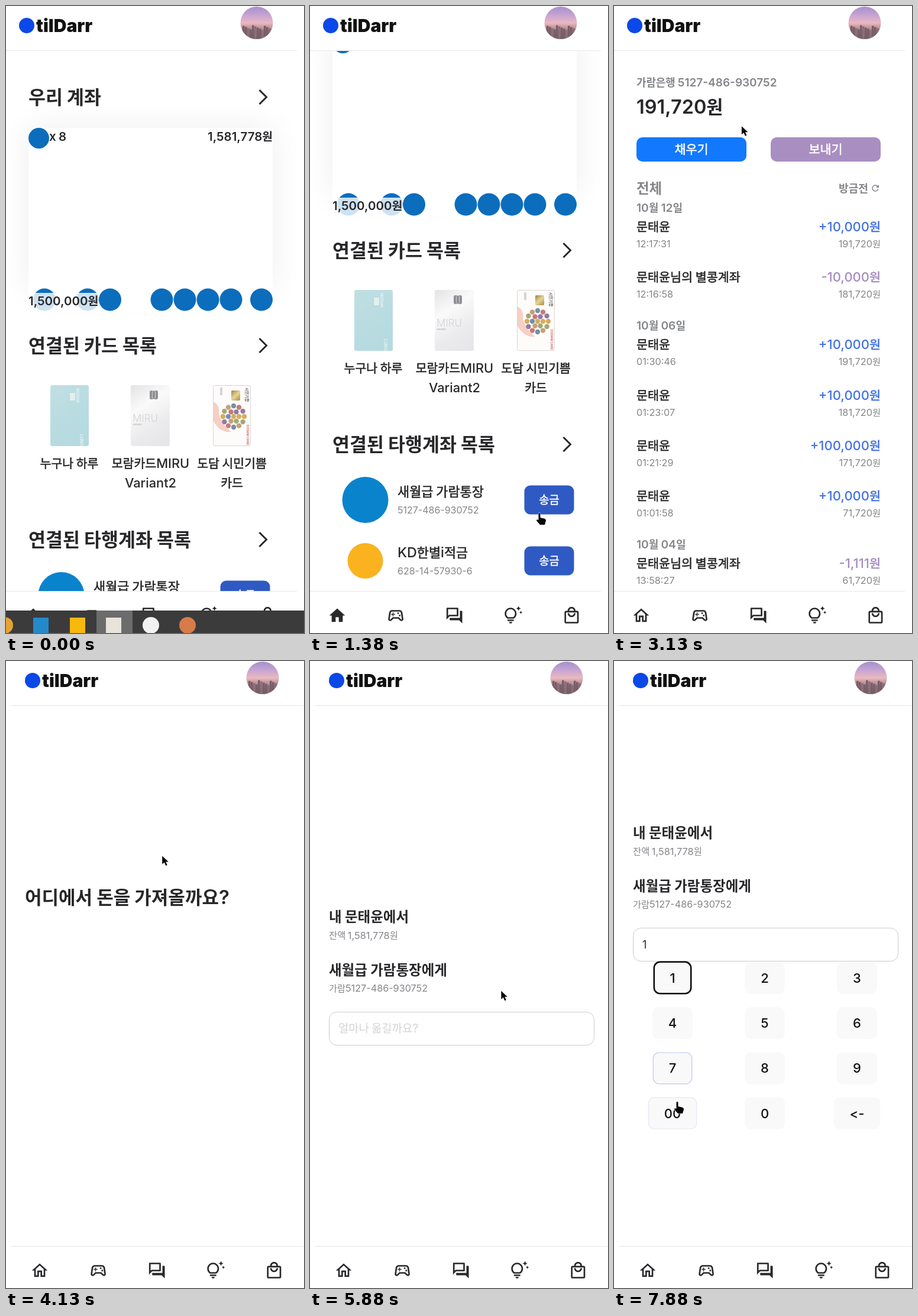
An HTML page with a canvas that plays this animation: 504 px wide and 1060 px high, repeating every 8 s.

```html
<!DOCTYPE html>
<html lang="ko">
<head>
<meta charset="utf-8">
<style>
html, body { margin: 0; width: 100%; height: 100%; overflow: hidden; background: #fff; }
canvas { display: block; }
</style>
</head>
<body>
<canvas id="stage" width="504" height="1060"></canvas>
<script>
const ctx = document.getElementById('stage').getContext('2d');
const INK = '#28282b', GREY = '#84868a', LILAC = '#a98ec2', BLUE = '#0a48e8', BALL = '#0c6dbd';
const OWNER = '문태윤', OWN_ACCOUNT = OWNER + '님의 별콩계좌';
const BANKS = [
  { name: '새월급 가람통장', no: '5127-486-930752', color: '#0a83cd' },
  { name: 'KD한별i적금', no: '628-14-57930-6', color: '#fab31e', short: '들빛' },
  { name: 'TRM기쁨돌보미통장', no: '417-09-685042-8', color: '#d3222c', short: '미르', square: true },
];
const HISTORY = [
  [373, 0, '12:17:31', '+10,000', '191,720'],
  [458, 1, '12:16:58', '-10,000', '181,720'],
  [572, 0, '01:30:46', '+10,000', '191,720'],
  [658, 0, '01:23:07', '+10,000', '181,720'],
  [743, 0, '01:21:29', '+100,000', '171,720'],
  [828, 0, '01:01:58', '+10,000', '71,720'],
  [942, 1, '13:58:27', '-1,111', '61,720'],
];
// Moments at which each screen or part of it appears.
const AT = { account: 2500, history: 2690, charge: 4000, sources: 4400, amount: 5630, keypad: 6250, digit: 7300 };
const CLICKS = [2200, 3480, 5480, 6130, 7250];
// time, scroll offset
const SCROLL = [[780, 0], [1380, 161], [1850, 250]];
// time, x, y, hand shape
const POINTER = [
  [880, 330, 1050, 0], [1250, 388, 857, 1], [1750, 388, 857, 1], [2100, 427, 744, 1],
  [2420, 427, 744, 0], [3130, 216, 203, 0], [3380, 190, 245, 1], [3750, 190, 245, 0],
  [4900, 414, 500, 1], [5750, 414, 500, 0], [6000, 241, 610, 0], [6250, 241, 600, 1],
  [6500, 241, 593, 1], [6700, 241, 593, 1], [7130, 104, 545, 1], [7380, 104, 545, 1],
  [7630, 105, 690, 1], [7750, 106, 712, 1], [7880, 107, 745, 1],
];
const HAND = new Path2D('M-1.500 1Q0-1 1.500 1V8L8 9.500Q11 10 11 13L9 20H1L-5 13Q-5 10-1.500 12Z');
const ARROW = new Path2D('M0 0V14L3.500 11 6 16.500 8.500 15.500 6 10H10.500Z');
const HOME = new Path2D('M10 20v-6h4v6h5v-8h3L12 3 2 12h3v8z');
const ICONS = [
  'M12 5.69l5 4.5V18h-2v-6H9v6H7v-7.81l5-4.5M12 3L2 12h3v8h6v-6h2v6h6v-8h3L12 3z',
  'M21.58 16.09l-1.09-7.66C20.21 6.46 18.52 5 16.53 5H7.47C5.48 5 3.79 6.46 3.51 8.43l-1.09 7.66C2.2 17.63 3.39 19 4.94 19c.68 0 1.32-.27 1.8-.75L9 16h6l2.25 2.25c.48.48 1.13.75 1.8.75 1.56 0 2.75-1.37 2.53-2.91zm-2.1.72c-.08.09-.21.19-.42.19-.15 0-.29-.06-.39-.16L15.83 14H8.17l-2.84 2.84c-.1.1-.24.16-.39.16-.21 0-.34-.1-.42-.19-.08-.09-.16-.23-.13-.44l1.09-7.66C5.63 7.74 6.48 7 7.47 7h9.06c.99 0 1.84.74 1.98 1.72l1.09 7.66c.03.2-.05.34-.12.43zM9 8H8v2H6v1h2v2h1v-2h2v-1H9zM14 8h2v2h-2zM16 11h2v2h-2z',
  'M15 4v7H5.17L4 12.17V4h11m1-2H3c-.55 0-1 .45-1 1v14l4-4h10c.55 0 1-.45 1-1V3c0-.55-.45-1-1-1zm5 4h-2v9H6v2c0 .55.45 1 1 1h11l4 4V7c0-.55-.45-1-1-1z',
  'M7 20h4c0 1.1-.9 2-2 2s-2-.9-2-2zm-2-1h8v-2H5v2zm11.5-9.5c0 3.82-2.66 5.86-3.77 6.5H5.27c-1.11-.64-3.77-2.68-3.77-6.5C1.5 5.36 4.86 2 9 2s7.5 3.36 7.5 7.5zm-2 0C14.5 6.47 12.03 4 9 4S3.5 6.47 3.5 9.5c0 2.47 1.49 3.89 2.35 4.5h6.3c.86-.61 2.35-2.03 2.35-4.5zm6.87-2.13L20 8l1.37.63L22 10l.63-1.37L24 8l-1.37-.63L22 6l-.63 1.37zM19 6l.94-2.06L22 3l-2.06-.94L19 0l-.94 2.06L16 3l2.06.94L19 6z',
  'M19 6h-2c0-2.76-2.24-5-5-5S7 3.24 7 6H5c-1.1 0-1.99.9-1.99 2L3 20c0 1.1.9 2 2 2h14c1.1 0 2-.9 2-2V8c0-1.1-.9-2-2-2zm-7-3c1.66 0 3 1.34 3 3H9c0-1.66 1.34-3 3-3zm7 17H5V8h14v12zm-7-8c-1.66 0-3-1.34-3-3H7c0 2.76 2.24 5 5 5s5-2.24 5-5h-2c0 1.66-1.34 3-3 3z',
].map(d => new Path2D(d));

const clamp = v => Math.max(0, Math.min(1, v));
const isKorean = run => /[가-힣 ]/.test(run);

function along(keys, t) {
  const i = keys.findIndex(k => k[0] > t);
  if (i === 0) return keys[0];
  if (i < 0) return keys[keys.length - 1];
  const a = keys[i - 1], b = keys[i], p = (t - a[0]) / (b[0] - a[0]);
  return a.map((v, n) => v + (b[n] - v) * p);
}

// '<' stays a run of its own so that "<-" does not turn into an arrow.
const split = str => str.match(/[가-힣 ]+|<|[^가-힣 <]+/g);

function setFont(run, size, weight) {
  ctx.font = isKorean(run)
    ? `${weight} ${size * .94}px "Noto Sans CJK KR", "Noto Sans CJK", sans-serif`
    : `${weight} ${size}px Inter, sans-serif`;
  return ctx.measureText(run).width;
}

const widthOf = (str, size, weight) =>
  split(str).reduce((sum, run) => sum + setFont(run, size, weight), 0);

// y is the middle of the line; align 0, .5 or 1 means left, centre or right.
function text(str, x, y, size, weight = 400, color = INK, align = 0) {
  x -= align * widthOf(str, size, weight);
  ctx.fillStyle = ctx.strokeStyle = color;
  ctx.lineWidth = size * .026;
  for (const run of split(str)) {
    const width = setFont(run, size, weight);
    ctx.fillText(run, x, y + size * .36);
    // The Korean face has no medium weight of its own.
    if (weight === 500 && isKorean(run)) ctx.strokeText(run, x, y + size * .36);
    x += width;
  }
}

function rect(x, y, w, h, fill, radius = 0) {
  ctx.beginPath();
  ctx.roundRect(x, y, w, h, radius);
  ctx.fillStyle = fill;
  ctx.fill();
}

function frame(x, y, w, h, color, line, radius) {
  ctx.beginPath();
  ctx.roundRect(x + line / 2, y + line / 2, w - line, h - line, radius);
  ctx.strokeStyle = color;
  ctx.lineWidth = line;
  ctx.stroke();
}

function disc(x, y, r, fill) {
  ctx.beginPath();
  ctx.arc(x, y, r, 0, 7);
  ctx.fillStyle = fill;
  ctx.fill();
}

function gradient(x0, y0, x1, y1, ...colors) {
  const g = ctx.createLinearGradient(x0, y0, x1, y1);
  colors.forEach((c, i) => g.addColorStop(i / (colors.length - 1), c));
  return g;
}

function mark(bank, x, y, r) {
  if (bank.square) rect(x - r, y - r, 2 * r, 2 * r, bank.color);
  else disc(x, y, r, bank.color);
}

function button(label, x, y, w, h, color, size = 22) {
  rect(x, y, w, h, color, 10);
  text(label, x + w / 2, y + h / 2, size, 500, '#fff', .5);
}

// Border that fades in and out as the pointer enters and leaves.
function hover(t, x, y, w, h) {
  let hits = 0;
  for (let k = 0; k < 6; k++) {
    const [, px, py] = along(POINTER, t - k * 45);
    if (px > x && px < x + w && py > y && py < y + h) hits++;
  }
  if (hits) frame(x, y, w, h, `rgba(100,108,235,${hits / 8})`, 1.2, 10);
}

function heading(str, y) {
  text(str, 38, y, 33.5, 600);
  ctx.beginPath();
  ctx.moveTo(428.5, y - 12);
  ctx.lineTo(440.5, y);
  ctx.lineTo(428.5, y + 12);
  ctx.strokeStyle = INK;
  ctx.lineWidth = 3;
  ctx.stroke();
}

function sideText(str, x, y, size, color) {
  ctx.save();
  ctx.translate(x, y);
  ctx.rotate(Math.PI / 2);
  text(str, 0, 0, size, 600, color);
  ctx.restore();
}

function cards() {
  rect(75, 641, 65, 103, gradient(75, 641, 140, 744, '#bfdfe3', '#b3d9df'), 3);
  rect(107, 653, 11, 15, '#e3efef', 2);
  frame(107, 653, 11, 15, '#a5c8cd', .7, 2);
  sideText('MODAM', 121, 646, 6, '#e6f5f6');
  sideText('LUNO', 128, 724, 7, '#e6f5f6');

  rect(211, 641, 66, 103, gradient(211, 641, 277, 744, '#e3e3e5', '#fafafa', '#ebebed', '#e5e5e7'), 3);
  rect(243, 650, 14, 15, '#8f9094', 3);
  frame(247, 650, 6, 15, '#d0d0d2', 1, 1);
  text('MIRU', 214, 697, 17, 300, '#d3d3d6');
  text('Variant2', 214, 708, 4, 500, '#b0b0b4');

  rect(350, 641, 64, 103, '#fdfcfb', 3);
  frame(350, 641, 64, 103, '#d8d5d3', 1, 3);
  rect(381, 650, 15, 17, gradient(381, 650, 396, 667, '#9b813f', '#e6d596', '#a98b45'), 2);
  rect(362, 645, 4, 13, '#d5d3d5');
  ctx.beginPath();
  ctx.moveTo(351, 669);
  ctx.quadraticCurveTo(362, 675, 360, 690);
  ctx.quadraticCurveTo(365, 708, 381, 720);
  ctx.quadraticCurveTo(362, 722, 351, 702);
  ctx.fillStyle = '#f6cfc5';
  ctx.fill();
  const colors = ['#d9ac5c', '#8f7aa9', '#c97a70', '#7391ae', '#cb9e75', '#a0aa76'];
  for (let i = 0; i < 19; i++) {
    const ring = i === 0 ? 0 : i < 7 ? 1 : 2;
    const angle = ring && i * Math.PI / (3 * ring);
    disc(385 + Math.cos(angle) * ring * 9, 694 + Math.sin(angle) * ring * 9, 4.2, colors[i * 5 % 6]);
  }
  sideText('시민기쁨', 408, 645, 7, '#77706c');
  sideText('DODAM CARD', 409, 708, 5, '#cf5b5b');

  const label = (str, x, y) => text(str, x, y, 21.8, 500, INK, .5);
  label('누구나 하루', 107, 773);
  label('모람카드MIRU', 244.5, 773);
  label('Variant2', 244.5, 806);
  label('도담 시민기쁨', 382, 773);
  label('카드', 382, 806);
}

function homeScreen(t) {
  ctx.translate(0, -Math.round(along(SCROLL, t)[1]));
  heading('우리 계좌', 154);

  ctx.shadowColor = 'rgba(0,0,0,.07)';
  ctx.shadowBlur = 50;
  rect(38, 206, 413, 276, '#fff');
  ctx.shadowColor = 'transparent';
  rect(38, 480, 413, 36, '#fff');
  disc(55.5, 223.5, 17.5, BALL);
  text('x 8', 73, 221, 20.5, 600);
  text('1,581,778원', 451, 221, 20.5, 600, INK, 1);
  disc(65, 496.5, 19, BALL);
  disc(138, 496.5, 19, BALL);
  rect(38, 485, 119, 31, 'rgba(255,255,255,.8)');
  for (const x of [176, 263.5, 302.5, 341.5, 380.5, 432]) disc(x, 496.5, 19, BALL);
  text('1,500,000원', 38, 499, 20.5, 600);

  heading('연결된 카드 목록', 574);
  cards();

  heading('연결된 타행계좌 목록', 902);
  BANKS.forEach((bank, i) => {
    const y = 996 + 103 * i;
    mark(bank, 93.5, y, [39, 30, 20][i]);
    text(bank.name, 148, y - 14, 23.3, 500);
    text(bank.no, 148, y + 17, 16, 400, GREY);
    button('송금', 362.5, y - 24.5, 84, 49, '#2f5ac3', 20);
  });
  if (t > 2130) frame(362, 971, 85, 50, '#0c0c10', 2.5, 10);
}

function accountScreen(t) {
  button('채우기', 38, 222, 186, 41, '#1279ff');
  button('보내기', 265, 222, 186, 41, LILAC);
  if (t < AT.history) return;
  text('가람은행 ' + BANKS[0].no, 38, 129, 19, 600, GREY);
  text('191,720원', 38, 170, 32.5, 600);
  text('전체', 38, 308, 25, 600, GREY);
  text('방금전', 430, 308, 19.3, 600, GREY, 1);
  ctx.beginPath();
  ctx.arc(442, 308, 5, .3, 5.6);
  ctx.strokeStyle = GREY;
  ctx.lineWidth = 1.5;
  ctx.stroke();
  ctx.beginPath();
  ctx.moveTo(448, 302);
  ctx.lineTo(448, 307);
  ctx.lineTo(443, 307);
  ctx.fillStyle = GREY;
  ctx.fill();

  [['10월 12일', 341], ['10월 06일', 540], ['10월 04일', 910]]
    .forEach(([day, y]) => text(day, 38, y, 19.2, 600, GREY));
  for (const [y, own, time, change, balance] of HISTORY) {
    text(own ? OWN_ACCOUNT : OWNER, 38, y, 22, 500);
    text(time, 38, y + 29, 16.2, 400, GREY);
    text(change + '원', 451, y, 22, 500, own ? '#a48cc0' : '#4272e6', 1);
    text(balance + '원', 451, y + 29, 16.3, 400, GREY, 1);
  }
}

function chargeScreen(t) {
  text('어디에서 돈을 가져올까요?', 32, 399, 33, 600);
  if (t < AT.sources) return;
  text('내 계좌', 32, 462, 25, 600);
  const sources = [
    { name: OWN_ACCOUNT, no: '58146-370925-418', short: '별콩', color: BLUE },
    BANKS[1], BANKS[2],
  ];
  sources.forEach((source, i) => {
    const y = 510 + 69 * i;
    mark(source, 59.5, y, [27.5, 21, 14][i]);
    text(source.name, 101, y - 14, 19.3, 600);
    text(source.short + source.no, 101, y + 14, 16.2, 400, GREY);
    button('채우기', 386, y - 21, 92, 42, LILAC);
    hover(t, 386, y - 21, 92, 42);
  });
}

function amountScreen(t) {
  const open = t >= AT.keypad, typed = t >= AT.digit;
  if (!open) ctx.translate(0, 142);
  text(`내 ${OWNER}에서`, 32, 290, 25, 600);
  text('잔액 1,581,778원', 32, 322, 16.4, 400, GREY);
  text(BANKS[0].name + '에게', 32, 380, 25, 600);
  text('가람' + BANKS[0].no, 32, 411, 16.2, 400, GREY);
  if (open) keypad(t);
  const focused = open && !typed;
  rect(32, 451, 449, 57, '#fff', 14);
  if (focused) frame(31.5, 450.5, 450, 58, '#0c0c10', 2.8, 13);
  else frame(32, 451, 449, 57, '#cbcbcf', 1, 13);
  if (typed) text('1', 48, 480, 18, 400);
  else text('얼마나 옮길까요?', 48, 479, 20, 400, '#d3d3d5');
  if (focused) rect(47, 469, 1.2, 21, '#111');
  if (typed) frame(66.5, 507.5, 65, 56, '#0c0c10', 2.6, 10);
}

function keypad(t) {
  ['1', '2', '3', '4', '5', '6', '7', '8', '9', '00', '0', '<-'].forEach((key, i) => {
    const x = 99 + 156 * (i % 3), y = 536 + 76.2 * Math.floor(i / 3);
    const w = widthOf(key, 22, 500) + 54;
    rect(x - w / 2, y - 27, w, 54, '#f9f9f9', 10);
    hover(t, x - w / 2, y - 27, w, 54);
    text(key, x, y, 22, 500, '#111', .5);
  });
}

function avatar(x, y) {
  ctx.save();
  ctx.beginPath();
  ctx.arc(x, y, 27.5, 0, 7);
  ctx.clip();
  rect(x - 28, y - 28, 56, 56, gradient(x, y - 28, x, y + 28, '#a58fcb', '#c3a2d3', '#eab9c0', '#a27c83', '#5f4d5c'));
  for (let i = 0; i < 14; i++) {
    const h = 4 + i * 7 % 9;
    rect(x - 28 + i * 4, y + 16 - h, 3.6, 40, i % 3 ? '#755f6b' : '#8f6d70');
  }
  ctx.restore();
}

function chrome(home, shift) {
  const edge = shift ? 8 : 0;
  rect(0, 0, 504, 75, '#fff');
  rect(0, 989, 504, 71, '#fff');
  rect(edge, 75, shift ? 495 : 492, 1, '#e6e7e9');
  rect(edge, 989, shift ? 495 : 492, 1, '#e6e7e9');
  disc(35 + shift, 33, 13, BLUE);
  text('tilDarr', 51 + shift, 33.5, 30, 900, '#111');
  avatar(424 + shift, 28.5);
  ICONS.forEach((icon, i) => {
    ctx.save();
    ctx.translate(46 + 99.1 * i + shift * 1.1, 1030.5);
    ctx.scale(4 / 3, 4 / 3);
    ctx.translate(-12, -12);
    ctx.fillStyle = INK;
    ctx.fill(home && i === 0 ? HOME : icon, 'evenodd');
    ctx.restore();
  });
}

function taskbar(t) {
  const drop = clamp((t - 440) / 190);
  if (drop === 1) return;
  ctx.save();
  ctx.translate(0, 38 * drop);
  rect(0, 1022, 504, 38, '#3b3b3c');
  rect(153, 1022, 61, 38, '#6c6c6d');
  disc(-2, 1047, 14, '#e5a236');
  rect(46, 1034, 26, 26, '#2489ca');
  rect(108, 1034, 26, 26, '#f8b90c');
  rect(169, 1034, 26, 26, '#e9e3dc');
  disc(245, 1047, 14, '#f2f2f2');
  disc(307, 1047, 14, '#d77b48');
  ctx.restore();
}

function pointer(t) {
  if (t < POINTER[0][0]) return;
  const [, x, y, hand] = along(POINTER, t);
  if (CLICKS.some(c => t >= c && t < c + 125)) return disc(x, y, 5.5, '#e3151b');
  ctx.save();
  ctx.translate(x, y);
  const shape = hand > .5 ? HAND : ARROW;
  ctx.strokeStyle = '#fff';
  ctx.lineWidth = 1.2;
  ctx.stroke(shape);
  ctx.fillStyle = '#050505';
  ctx.fill(shape);
  ctx.restore();
}

function draw() {
  const t = performance.now() % 8000;
  const screen = t < AT.account ? homeScreen
    : t < AT.charge ? accountScreen
    : t < AT.amount ? chargeScreen : amountScreen;
  rect(0, 0, 504, 1060, '#fff');
  ctx.save();
  screen(t);
  ctx.restore();
  chrome(screen === homeScreen, t < AT.charge ? 0 : 10);
  if (t > 4380 && t % 1000 < 500) rect(255, 18, 1, 26, '#222');
  taskbar(t);
  pointer(t);
  requestAnimationFrame(draw);
}
draw();
</script>
</body>
</html>
```
